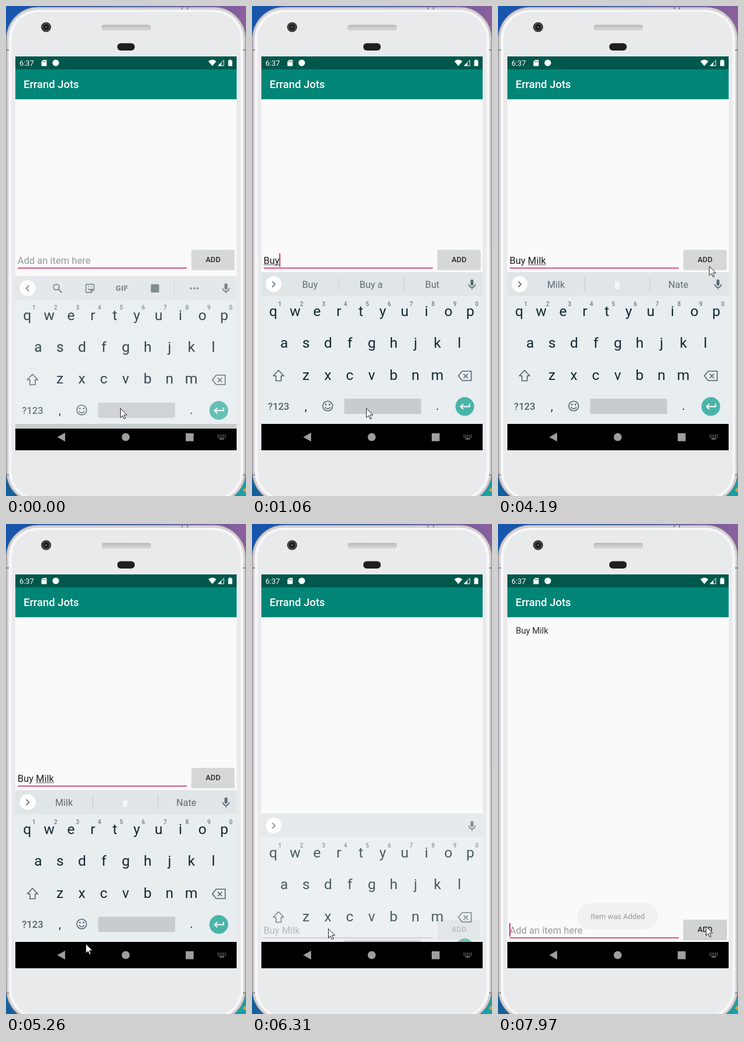
Recreate the animation shown at these times as an HTML page. Size 410x836 px, loop 8000 ms.

```html
<!DOCTYPE html>
<html lang="en">
<head>
<meta charset="utf-8">
<title>Errand Jots</title>
<style>
  html, body { margin: 0; width: 100%; height: 100%; overflow: hidden; background: #1d4f9c; }
  svg { display: block; width: 100%; height: 100%; font-family: Roboto, "Noto Sans", sans-serif; }
  text { white-space: pre; }
  .mid { text-anchor: middle; }
  .med { font-weight: 500; }
  .line { fill: none; stroke: #51636a; stroke-width: 1.6; }
  .keys { font-size: 24.5px; fill: #10282f; }
  .hints { font-size: 10px; font-weight: 500; fill: #6b787e; }
  .words { font-size: 16.2px; fill: #616d74; }
</style>
</head>
<body>
<svg viewBox="0 0 410 836" xmlns="http://www.w3.org/2000/svg">
  <defs>
    <linearGradient id="sky"><stop offset="0" stop-color="#1556ac"/><stop offset=".6" stop-color="#3f55a6"/><stop offset="1" stop-color="#8c609c"/></linearGradient>
    <linearGradient id="sea"><stop offset="0" stop-color="#125f9c"/><stop offset="1" stop-color="#17a0a8"/></linearGradient>
    <linearGradient id="slot" x2="0" y2="1"><stop offset="0" stop-color="#b4b6b8"/><stop offset=".5" stop-color="#cbcccd"/><stop offset="1" stop-color="#d9dadb"/></linearGradient>
    <linearGradient id="shade" x2="0" y2="1"><stop offset="0" stop-color="#000" stop-opacity=".1"/><stop offset="1" stop-color="#000" stop-opacity="0"/></linearGradient>
    <clipPath id="view"><rect x="16" y="160" width="378" height="553"/></clipPath>
    <clipPath id="room"><rect x="16" y="440" width="378" height="273"/></clipPath>
  </defs>

  <!-- desktop and phone body -->
  <rect width="410" height="420" fill="url(#sky)"/>
  <rect y="420" width="410" height="416" fill="url(#sea)"/>
  <path d="M404 826L410 821V830Z" fill="#e59a2c"/>
  <rect x=".7" y="2" width="408.6" height="846" rx="54" fill="#d9d5d7" stroke="#998f93" stroke-width="1.2"/>
  <rect x="3.6" y="5.5" width="402.8" height="839" rx="51" fill="#f6f6f7" stroke="#c3bdc0"/>
  <rect x="9.5" y="10.5" width="391" height="829" rx="46" fill="#e9eaec"/>
  <path d="M0 75H5M405 75H410M0 800H5M405 800H410M301 2V6M310 2V6" stroke="#8d8286" stroke-width="2"/>
  <circle cx="68.5" cy="36" r="8.6" fill="#3b3b3d"/>
  <circle cx="68.5" cy="36" r="5.6" fill="#19191b" stroke="#606064"/>
  <circle cx="68.5" cy="36" r="2" fill="#53565b"/>
  <rect x="164" y="32.5" width="83" height="8.5" rx="3" fill="url(#slot)" stroke="#bcbdbf" stroke-width=".7"/>
  <rect x="190" y="63.5" width="30" height="12.5" rx="6.2" fill="#1f1f22"/>

  <!-- app -->
  <rect x="16" y="86" width="378" height="672" fill="#fafafa"/>
  <rect x="16" y="86" width="378" height="22" fill="#00574b"/>
  <rect x="16" y="108" width="378" height="51" fill="#008577"/>
  <rect x="16" y="159" width="378" height="2" fill="url(#shade)"/>
  <g fill="#fff">
    <text x="23" y="101.7" font-size="12.9">6:37</text>
    <path d="M63.3 92H69.5V102.5H60.5V95Z"/>
    <path d="M63.5 93.5V96M65.5 93.5V96M67.5 93.5V96" stroke="#00574b" stroke-width=".8"/>
    <circle cx="85" cy="97" r="5.6"/>
    <path d="M345.6 94.2Q352.5 88.8 359.4 94.2L352.5 102.5Z"/>
    <path d="M372 92.4V102H362.4Z" fill="none" stroke="#fff"/>
    <path d="M368 96.4V102H362.4Z"/>
    <path d="M379.5 92.7H381.3V91.5H384.7V92.7H386.5V102.6H379.5Z"/>
    <text class="med" x="30" y="140.3" font-size="18.4">Errand Jots</text>
  </g>
  <text id="item" x="30.5" y="187.2" font-size="14.72" fill="#2b2b2b">Buy Milk</text>
  <g clip-path="url(#view)">
    <g id="form">
      <text id="field" x="19.7" y="440" font-size="16.56"/>
      <rect id="mark" y="441" height="1" fill="#666"/>
      <rect x="20" y="446.4" width="289" height="1.5" fill="#cb2560"/>
      <rect id="caret" y="422" width="1.8" height="23" fill="#d81b60"/>
      <rect id="drop" x="316.5" y="417" width="74.5" height="34" rx="2" fill="#000"/>
      <rect id="button" x="317" y="416" width="73" height="34" rx="2"/>
      <text class="med mid" x="353.6" y="437.3" font-size="12.9" fill="#2a2a2a">ADD</text>
    </g>
  </g>
  <g id="toast">
    <rect x="136" y="647" width="137" height="45" rx="21" fill="#eaeaea"/>
    <text class="mid" x="204.5" y="674" font-size="12.9" fill="#3a3a3a">Item was Added</text>
  </g>

  <!-- navigation bar -->
  <rect x="16" y="713" width="378" height="45" fill="#000"/>
  <g fill="#9e9e9e">
    <path d="M87.5 735.5L101 728V743Z"/>
    <circle cx="204.5" cy="735.5" r="6.8"/>
    <rect x="307" y="729" width="13.5" height="13.5"/>
    <path d="M361.5 732.5H375.5M361.5 735.5H375.5" stroke="#9e9e9e" stroke-width="1.6" stroke-dasharray="1.6 1.5"/>
    <path d="M364.5 738.5H372.5" stroke="#9e9e9e" stroke-width="1.6"/>
  </g>

  <!-- keyboard -->
  <rect id="lip" x="16" y="713" width="378" height="8" fill="#c9cccf"/>
  <g clip-path="url(#room)">
    <g id="board">
      <rect x="16" y="454" width="378" height="260" fill="#e8edf0"/>
      <rect x="16" y="454" width="378" height="41" fill="#e0e5e8"/>
      <circle cx="37" cy="475.4" r="14" fill="#cdd2d5"/>
      <circle cx="37" cy="474.8" r="13.8" fill="#fff"/>
      <path id="chevron" class="line"/>
      <g fill="#5b6a71">
        <rect x="373.3" y="466.5" width="5" height="10.5" rx="2.5"/>
        <path d="M370.3 474.5a5.5 5.5 0 0 0 11 0M375.8 480V483.5" class="line" stroke-width="1.4"/>
      </g>
      <g id="tools" fill="#6b787e">
        <circle cx="86" cy="472.7" r="4.8" class="line"/>
        <path d="M89.5 476.3L95.5 482.3" class="line" style="stroke-width:2"/>
        <path d="M138 468H149Q150.5 468 150.5 469.5V477L145.5 482H138Q136.5 482 136.5 480.5V469.5Q136.5 468 138 468ZM150.5 477H145.5V482M140 475.5Q143.5 479.5 147 475.5" class="line" style="stroke-width:1.4"/>
        <circle cx="141" cy="472" r="1"/><circle cx="146" cy="472" r="1"/>
        <text class="mid" x="198" y="479.6" font-size="13" font-weight="900" letter-spacing=".5">GIF</text>
        <rect x="247.5" y="468" width="14" height="14" rx="1"/>
        <path d="M287.5 464V485" stroke="#c3c9cc"/>
        <circle cx="316" cy="475" r="1.8"/><circle cx="321.7" cy="475" r="1.8"/><circle cx="327.4" cy="475" r="1.8"/>
      </g>
      <g id="bar" class="words">
        <path d="M148.5 463V486M259.5 463V486" stroke="#c3c9cc"/>
        <text class="mid" x="99" y="481"/>
        <text class="mid" x="203.5" y="481"/>
        <text class="mid" x="308" y="481"/>
        <g id="glass">
          <path d="M198 466.5H209L207.8 484H199.2Z" fill="#e6eaec" stroke="#d3d9dc" stroke-width=".8"/>
          <path d="M199 472H208L207.2 483H199.8Z" fill="#f4f6f6"/>
        </g>
      </g>
      <g id="letters" class="keys mid"></g>
      <g id="digits" class="hints mid"></g>
      <path class="line" d="M45.3 621.5L54.3 631H49.8V639.5H40.8V631H36.3Z" stroke-linejoin="round"/>
      <path class="line" d="M359 623H374.5V639H359L352.5 631ZM361.5 627.5L369 635M369 627.5L361.5 635"/>
      <text class="med mid" x="45.5" y="689" font-size="16.6" fill="#51636a">?123</text>
      <text class="keys mid" x="92" y="690" style="font-size:20px">,</text>
      <text class="keys mid" x="317" y="689" style="font-size:20px">.</text>
      <circle class="line" cx="129.3" cy="682.5" r="8.3"/>
      <path class="line" d="M124.8 684.5Q129.3 690.5 133.8 684.5"/>
      <circle cx="126.3" cy="680" r="1.4" fill="#51636a"/><circle cx="132.3" cy="680" r="1.4" fill="#51636a"/>
      <rect x="157.5" y="670" width="131.5" height="26" rx="2.5" fill="#c8ccce"/>
      <circle cx="363.5" cy="683.2" r="16" fill="#4ab4a9"/>
      <path d="M371.5 678.5V683.5H356.5M361 678.8L356.3 683.5L361 688.2" fill="none" stroke="#fff" stroke-width="1.9"/>
    </g>
  </g>

  <path id="mouse" d="M.5 .5V16.3L4.2 12.8L6.7 18.6L9.1 17.6L6.6 11.8H11.6Z" fill="#fff" stroke="#222" stroke-width="1"/>
</svg>
<script>
const LOOP = 8000;
const $ = id => document.getElementById(id);
const set = (el, attrs) => { for (const k in attrs) el.setAttribute(k, attrs[k]); };
const show = (el, on) => el.setAttribute('visibility', on ? 'visible' : 'hidden');

// last entry whose time has come
const at = (track, t) => track.filter(e => e[0] <= t).pop().slice(1);

const typed = [[0, ''], [800, 'B'], [940, 'Bu'], [1060, 'Buy'], [1430, 'Buy '],
  [2240, 'Buy M'], [2380, 'Buy Mi'], [2630, 'Buy Milk'], [7610, '']];
const guesses = [[0], [940, 'Bu', 'Buy', 'But'], [1060, 'Buy', 'Buy a', 'But'],
  [1430, 'it', 'a', 'the'], [2240, 'M', 'Me', 'My'], [2380, 'Mi', 'Milk', 'Nate'],
  [2630, 'Milk', '', 'Nate'], [6030]];
const blinks = [550, 1830, 2240, 3130, 3640, 4190, 4720, 5120, 5650, 6310, 6550, 7100, 7610];
const pointer = [[0, 195, 686], [3520, 232, 630], [3640, 315, 490], [3770, 356, 412],
  [3920, 360, 408], [4070, 361, 428], [4190, 360.5, 443.5], [4990, 290, 540], [5120, 167, 681],
  [5260, 136, 716], [5380, 112, 745], [5500, 104, 757], [5650, 97, 728], [6310, 130, 690],
  [6430, 235, 585], [6550, 320, 513], [6700, 345, 620], [6820, 356, 662], [6970, 355, 671],
  [7100, 355, 680], [7220, 355, 686]];
const slide = [[0, 6.8, .84], [150, 0, 1], [6310, 40, .75], [6430, 140, .4], [6550, 260, 0]];
const fade = [[0, 0], [7850, .15], [7970, .5]];

const STEP = 37.4;
function addText(group, chars, x, y) {
  [...chars].forEach((c, i) => {
    const el = document.createElementNS('http://www.w3.org/2000/svg', 'text');
    set(el, { x: x + i * STEP, y });
    el.textContent = c;
    group.append(el);
  });
}
addText($('letters'), 'qwertyuiop', 36.3, 529);
addText($('letters'), 'asdfghjkl', 55, 583);
addText($('letters'), 'zxcvbnm', 92.2, 637.5);
addText($('digits'), '1234567890', 47.5, 511.5);

const pen = document.createElement('canvas').getContext('2d');
function widthOf(s) {
  pen.font = '16.56px Roboto, "Noto Sans", sans-serif';
  return pen.measureText(s).width;
}
const slots = $('bar').querySelectorAll('text');

function drawField(t) {
  const [text] = at(typed, t);
  const start = text.lastIndexOf(' ') + 1;
  const from = widthOf(text.slice(0, start)), end = widthOf(text);
  const pressed = t >= 7490;
  set($('form'), { transform: `translate(0 ${t < 6310 ? 0 : 259})` });
  $('field').textContent = text || 'Add an item here';
  set($('field'), { fill: text ? '#212121' : '#9a9a9a' });
  set($('mark'), { x: 19.7 + from, width: t < 6030 ? end - from : 0 });
  set($('caret'), { x: 19.3 + end });
  show($('caret'), blinks.filter(b => b <= t).length % 2);
  set($('button'), { fill: pressed ? '#d2d3d3' : '#d6d7d7' });
  set($('drop'), { opacity: pressed ? .2 : .1 });
}

function drawBoard(t) {
  const [dy, opacity] = at(slide, t);
  const words = at(guesses, t);
  const tools = t < 940;
  set($('board'), { transform: `translate(0 ${dy})`, opacity });
  show($('lip'), t < 150);
  show($('tools'), tools);
  set($('chevron'), { d: tools ? 'M39.3 470L34.5 474.8L39.3 479.6' : 'M34.5 470L39.3 474.8L34.5 479.6' });
  show($('bar'), words.length);
  show($('glass'), words.length && !words[1]);
  slots.forEach((el, i) => { el.textContent = words[i] || ''; });
}

function draw(t) {
  drawField(t);
  drawBoard(t);
  show($('item'), t >= 7850);
  set($('toast'), { opacity: at(fade, t)[0] });
  set($('mouse'), { transform: `translate(${at(pointer, t).join(' ')})` });
}

const begin = performance.now();
function tick() {
  draw((performance.now() - begin) % LOOP);
  requestAnimationFrame(tick);
}
tick();
</script>
</body>
</html>
```
